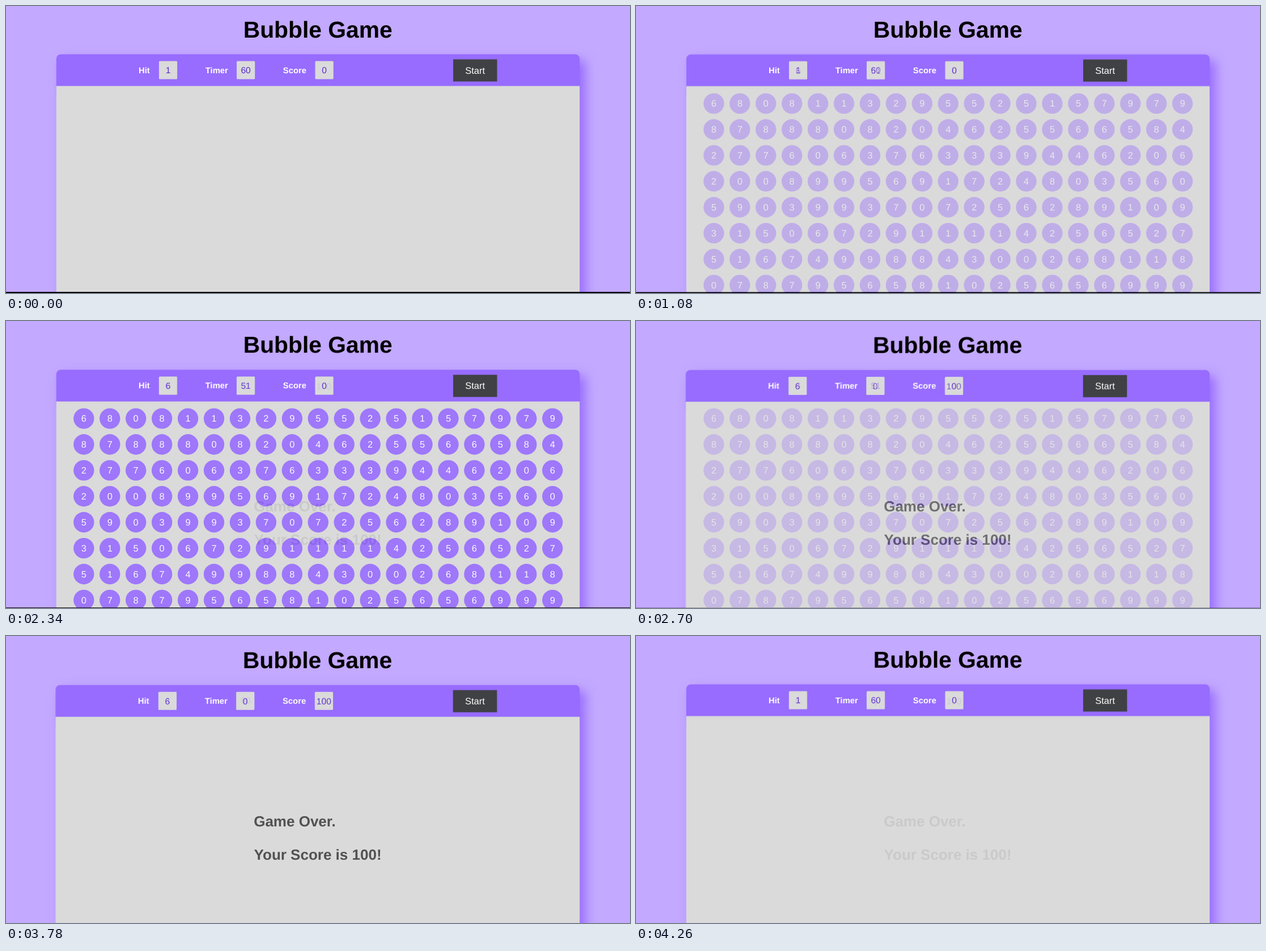
Recreate the animation shown at these times as an HTML page. Size 1101 by 508 pixels, loop 4.32 s.

```html
<!DOCTYPE html>
<html lang="en">
<head>
<meta charset="utf-8">
<title>Bubble Game</title>
<style>
  html, body { margin: 0; width: 100%; height: 100%; overflow: hidden; background: #c3a9ff; }
  svg { display: block; width: 100%; height: 100%; }
  text { font-family: "Liberation Sans", Arial, sans-serif; text-rendering: geometricPrecision; }
  .title { font-size: 40.8px; font-weight: bold; }
  .label { font-size: 14.8px; font-weight: bold; fill: #fff; }
  .value { font-size: 15.6px; fill: #5a2bd0; }
  .start { font-size: 16.5px; fill: #fff; }
  .digit { font-size: 16.4px; fill: #fff; }
  .over { font-size: 26px; font-weight: bold; fill: #434345; }
  .mid { text-anchor: middle; }
</style>
</head>
<body>
<svg id="stage" viewBox="0 0 1101 508" xmlns="http://www.w3.org/2000/svg">
  <defs>
    <filter id="blur" filterUnits="userSpaceOnUse" x="0" y="0" width="1101" height="800">
      <feGaussianBlur stdDeviation="10"/>
    </filter>
  </defs>
</svg>
<script>
const STEP = 60, HOLD = 900, PART = 1440, LOOP = 3 * PART;
const PURPLE = '#976cff', GREY = '#dadada';
const ROWS = [
  '6808113295525157979',
  '8788808204625566584',
  '2776063763339446206',
  '2008995691724803560',
  '5903993707256289109',
  '3150672911114256527',
  '5167499884300268118',
  '0787956581025656999'
];

const rect = (x, y, w, h, fill, extra = '') =>
  `<rect x="${x}" y="${y}" width="${w}" height="${h}" fill="${fill}" ${extra}/>`;
const text = (cls, x, y, s) => `<text class="${cls}" x="${x}" y="${y}">${s}</text>`;

function field(name, x, boxX, value) {
  return text('label', x, 118.6, name) +
    rect(boxX, 97.4, 32.2, 32.2, GREY, 'rx="1.5"') +
    text('value mid', boxX + 16.1, 119, value);
}

function page(hit, timer, score) {
  return text('title mid', 550.2, 55.6, 'Bubble Game') +
    rect(99, 95.5, 923.3, 700, PURPLE, 'rx="8" filter="url(#blur)"') +
    rect(88.8, 85.4, 923.4, 80, PURPLE, 'rx="8"') +
    rect(88.8, 141.6, 923.4, 400, GREY) +
    field('Hit', 234, 269.9, hit) +
    field('Timer', 351.8, 407, timer) +
    field('Score', 488.8, 545.5, score) +
    rect(789, 94.4, 77.5, 39.2, '#404144') +
    text('start mid', 827.7, 119.6, 'Start');
}

function bubbles() {
  return ROWS.map((row, r) => [...row].map((d, c) => {
    const x = 137.3 + 45.94 * c, y = 172.6 + 45.9 * r;
    return `<circle cx="${x}" cy="${y}" r="18.2" fill="${PURPLE}"/>` +
      text('digit mid', x, y + 5.8, d);
  }).join('')).join('');
}

// Each scene is opaque, so fading one over another is a plain cross-fade.
function addScene(move, pageArt, rest, barHeight) {
  const g = document.createElementNS('http://www.w3.org/2000/svg', 'g');
  g.innerHTML = rect(0, 0, 1101, 508, '#c3a9ff') +
    `<g transform="${move}">${pageArt}</g>` + rest +
    (barHeight ? rect(0, 508 - barHeight, 1101, barHeight, '#000', 'class="bar"') : '');
  document.getElementById('stage').append(g);
  return g;
}

const idle = addScene('', page(1, 60, 0), '', 2);
const play = addScene('translate(0 .8)', page(6, 51, 0), bubbles(), 1);
const over = addScene('translate(-1.62 1.5) scale(1.0016 1)', page(6, 0, 100),
  text('over', 437.2, 336.5, 'Game Over.') +
  text('over', 437.6, 396, 'Your Score is 100!'), 0);
const idleBar = idle.querySelector('.bar');

function draw(ms) {
  const t = ms % LOOP, part = Math.floor(t / PART), local = t % PART;
  const fade = local < HOLD ? 0 : (Math.floor((local - HOLD) / STEP) + 1) / 10;
  play.setAttribute('opacity', [fade, 1, 0][part]);
  over.setAttribute('opacity', [0, fade, 1 - fade][part]);
  idleBar.setAttribute('opacity', part === 2 ? 0 : 1);
}

let begin;
function tick(now) {
  begin ??= now;
  draw(now - begin);
  requestAnimationFrame(tick);
}
draw(0);
requestAnimationFrame(tick);
</script>
</body>
</html>
```
